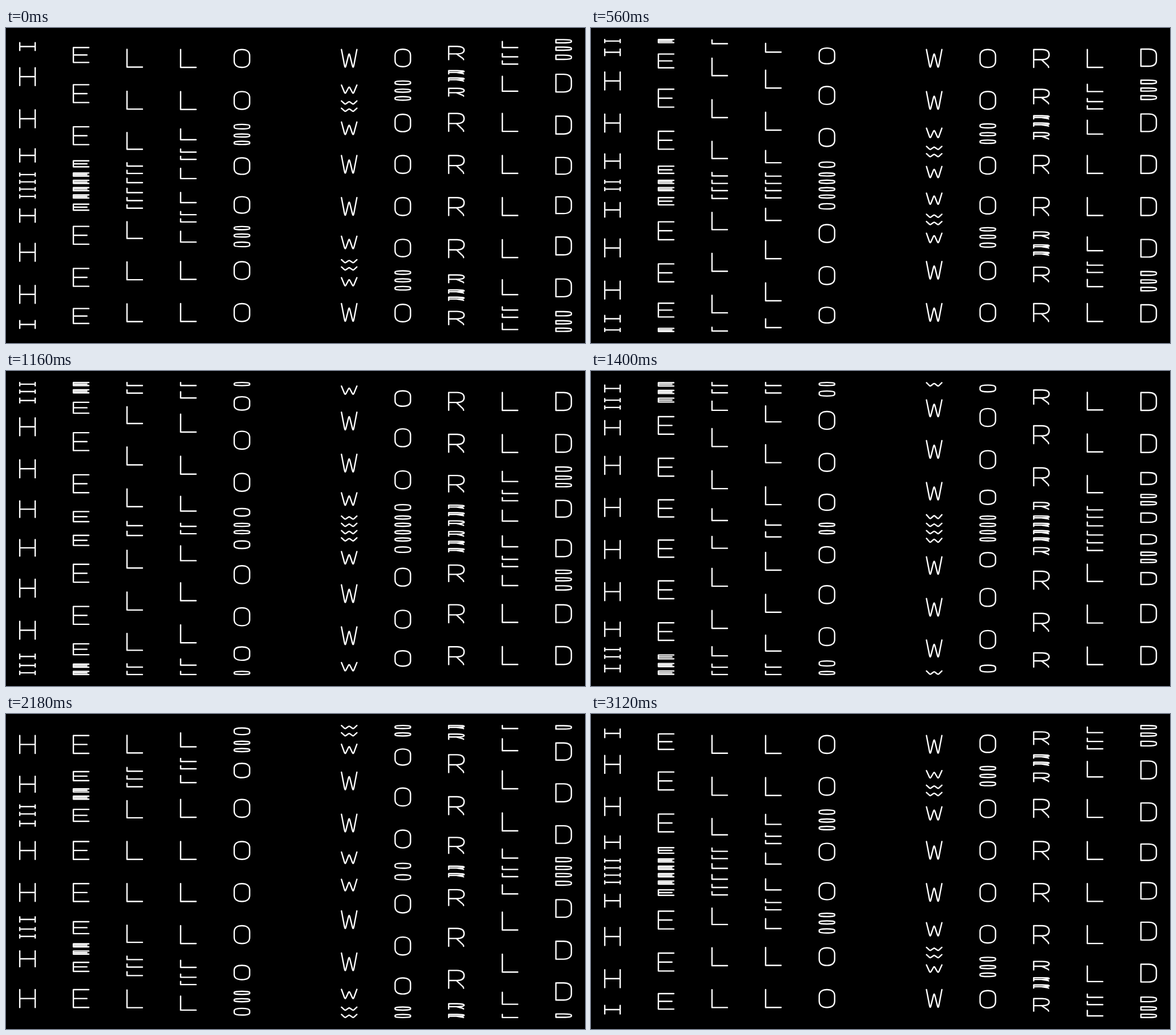
Write an HTML page that moves like this. It is 1014 px wide and 552 px high and loops after 3140 ms.

```html
<!DOCTYPE html>
<html lang="en">
<head>
<meta charset="utf-8">
<title>Hello world</title>
<style>
  html, body { margin: 0; width: 100%; height: 100%; overflow: hidden; background: #000; }
  svg { display: block; width: 100%; height: 100%; }
  path {
    fill: none; stroke: #fff; stroke-width: 2.4;
    stroke-linecap: round; stroke-linejoin: round;
    vector-effect: non-scaling-stroke;
  }
</style>
</head>
<body>
<svg viewBox="0 0 1014 552" role="img" aria-label="HELLO WORLD"></svg>
<script>
const LOOP = 3140, ROWS = 6, MIDDLE = 276;
const CELL_MIN = 12.7, CELL_MAX = 73.8;
const FIRST_X = 37.6, COLUMN_STEP = 93.9, HALF_WIDTH = 13.5;
const HALF_HEIGHT = 0.212; // share of the cell
const START = Math.PI + 0.143, COLUMN_LAG = Math.PI / 8, ROW_LAG = Math.PI / 3;

// Glyph outlines in a box from -1 to 1
const GLYPHS = {
  H: 'M-1-1V1M1-1V1M-1 0H1',
  E: 'M1-1H-1V1H1M-1 0H.76',
  L: 'M-1-1V1H1',
  O: 'M0-1C.6-1 1-.77 1-.3V.3C1 .77 .6 1 0 1C-.6 1-1 .77-1 .3V-.3C-1-.77-.6-1 0-1Z',
  W: 'M-1-1L-.6 .8Q-.51 1.14-.42 .8L-.08-.38Q0-.62 .08-.38L.42 .8Q.51 1.14 .6 .8L1-1',
  R: 'M-1 1V-1H.1C.68-1 1-.8 1-.43C1-.06 .68 .13 .1 .13H-1M0 .13L.78 .77Q.93 .88 .93 1',
  D: 'M-1-1H0C.62-1 1-.77 1-.3V.3C1 .77 .62 1 0 1H-1Z'
};

const svg = document.querySelector('svg');

function addGlyph(letter) {
  const path = document.createElementNS(svg.namespaceURI, 'path');
  path.setAttribute('d', GLYPHS[letter]);
  return svg.appendChild(path);
}

const columns = [];
[...'HELLO WORLD'].forEach((letter, index) => {
  if (letter === ' ') return;
  const glyphs = Array.from({ length: ROWS * 2 }, () => addGlyph(letter));
  columns.push({ index, x: FIRST_X + index * COLUMN_STEP, glyphs });
});

// Sine pushed towards a square wave
function wave(angle) {
  const s = Math.sin(angle);
  return Math.tanh(2.65 * s + 3 * s ** 3);
}

function place(glyph, x, y, height) {
  glyph.setAttribute('transform',
    `matrix(${HALF_WIDTH} 0 0 ${height * HALF_HEIGHT} ${x} ${y})`);
}

function draw(ms) {
  const turn = (ms % LOOP) / LOOP * Math.PI * 2 + START;
  for (const { index, x, glyphs } of columns) {
    let edge = 0; // distance from the middle line
    for (let row = ROWS - 1; row >= 0; row--) {
      const level = wave(turn - row * ROW_LAG - index * COLUMN_LAG);
      const height = CELL_MIN + (CELL_MAX - CELL_MIN) * (level + 1) / 2;
      const offset = edge + height / 2;
      place(glyphs[row], x, MIDDLE - offset, height);
      place(glyphs[ROWS * 2 - 1 - row], x, MIDDLE + offset, height);
      edge += height;
    }
  }
}

const begin = performance.now();
function tick() {
  draw(performance.now() - begin);
  requestAnimationFrame(tick);
}
tick();
</script>
</body>
</html>
```
